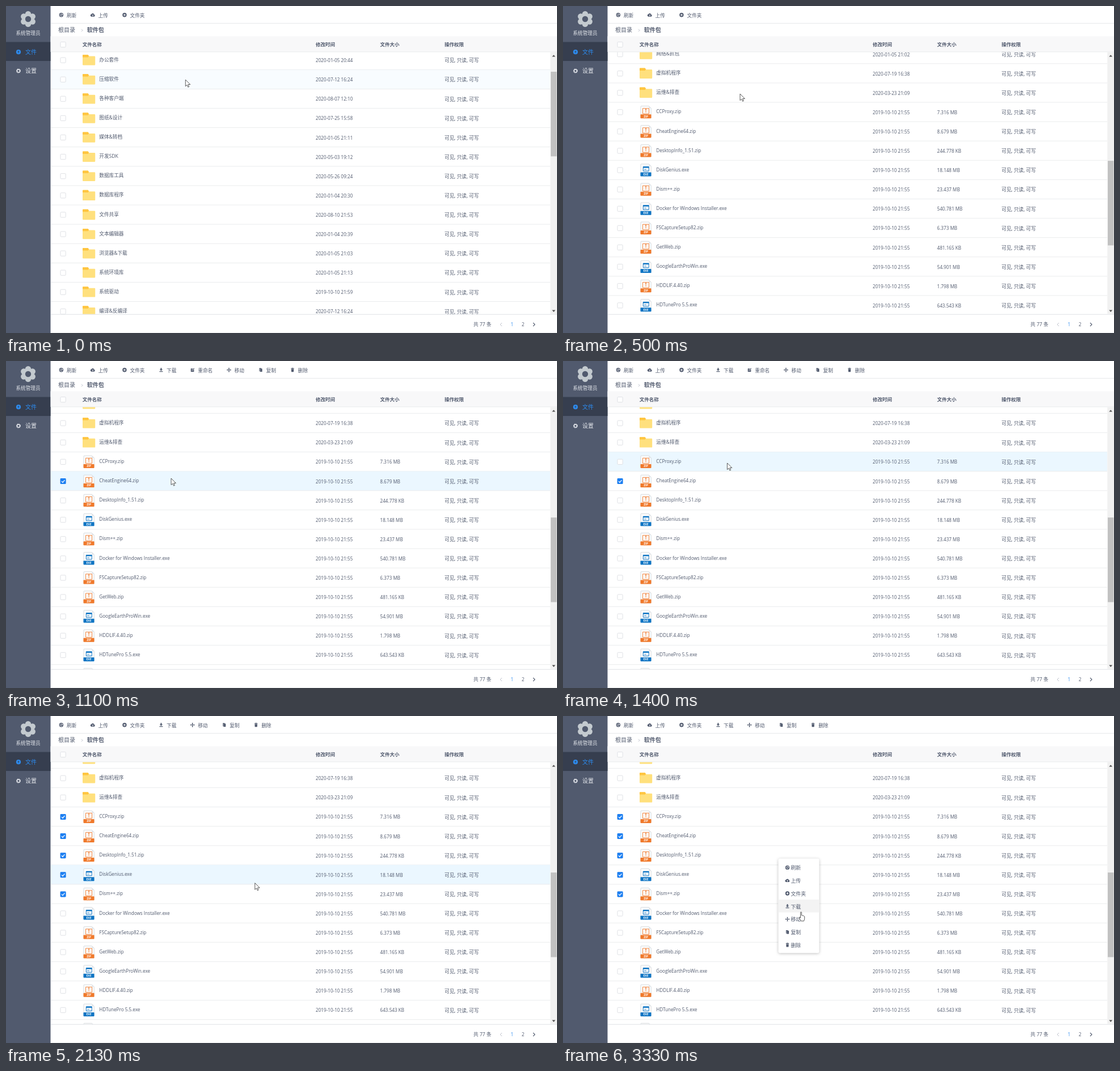
Write an HTML page that moves like this. It is 971 px wide and 577 px high and loops after 4330 ms.

```html
<!DOCTYPE html>
<html>
<head>
<meta charset="utf-8">
<style>
html, body { margin: 0; width: 100%; height: 100%; overflow: hidden; background: #fff; }
svg { display: block; width: 971px; height: 577px; }
text { font-family: "Open Sans", "Noto Sans CJK SC", "Noto Sans CJK", sans-serif; font-size: 8.65px; fill: #515a6e; white-space: pre; }
.latin { font-size: 8.15px; }
.big { font-size: 10px; }
.bold { font-weight: 700; }
.tag { font-size: 5px; font-weight: 700; fill: #fff; text-anchor: middle; }
</style>
</head>
<body>
<svg id="stage" viewBox="0 0 971 577" xmlns="http://www.w3.org/2000/svg"></svg>
<script>
const LOOP = 4330, PITCH = 34.1, FIRST = 95.2;
const INK = '#515a6e', BLUE = '#2d8cf0', LINE = '#e8eaec';
const stage = document.getElementById('stage');
const $ = id => document.getElementById(id);

const rect = (x, y, w, h, fill, more = '') =>
  `<rect x="${x}" y="${y}" width="${w}" height="${h}" fill="${fill}" ${more}/>`;
const dot = (x, y, r, fill, more = '') =>
  `<circle cx="${x}" cy="${y}" r="${r}" fill="${fill}" ${more}/>`;
const path = (d, fill, more = '') => `<path d="${d}" fill="${fill}" ${more}/>`;
const stroke = (d, color, w = 1, more = '') =>
  path(d, 'none', `stroke="${color}" stroke-width="${w}" ${more}`);
const text = (x, y, s, cls = '', more = '') =>
  `<text x="${x}" y="${y}" class="${cls}" ${more}>${s.replace(/&/g, '&amp;')}</text>`;
const group = (id, body, more = '') => `<g id="${id}" ${more}>${body}</g>`;
const at = (x, y, body) => `<g transform="translate(${x} ${y})">${body}</g>`;

// Small icons, centred on 0,0
const icons = {
  refresh: dot(0, 0, 3.7, INK) + stroke('M1.7-.8A1.9 1.9 0 1 0 1.6 1.1M2.2-2V-.4H.6', '#fff', .8),
  upload: path('M-2.4 2.9A2.1 2.1 0 0 1-2.6-1.2A2.8 2.8 0 0 1 2.5-.9A2 2 0 0 1 2.4 2.9Z', INK) +
    stroke('M0 2.4V-.2M-1.2 .8L0-.4L1.2 .8', '#fff', .8),
  folder: dot(0, 0, 3.7, INK) + stroke('M-2 0H2M0-2V2', '#fff', 1),
  download: path('M-1-3.6H1V-1H2.7L0 1.7L-2.7-1H-1Z', INK) + rect(-3, 2.2, 6, 1.2, INK),
  rename: path('M-3-2.6H1L-1.2-.4V1.2H.4L2.6-1V3.2H-3Z', INK) + stroke('M-.5 .5L3-3', INK, 1.2),
  move: stroke('M-3.4 0H3.4M0-3.4V3.4', INK, 1.1) +
    path('M0-4L1.5-2.4H-1.5ZM0 4L1.5 2.4H-1.5ZM-4 0L-2.4-1.5V1.5ZM4 0L2.4-1.5V1.5Z', INK),
  copy: path('M-2.6-3.3H1V-2.2H2.6V3.3H-1.4V2.2H-2.6Z', INK) + stroke('M-1.4-2V2.2', '#fff', .5),
  trash: rect(-2.7, -3.2, 5.4, 1.1, INK) + path('M-2.3-1.6H2.3L2 3.4H-2Z', INK) + rect(-1, -3.8, 2, 1, INK)
};
const tools = [
  ['refresh', '刷新', 107], ['upload', '上传', 162.5], ['folder', '文件夹', 218.5],
  ['download', '下载', 283], ['rename', '重命名', 338.3], ['move', '移动', 402.5],
  ['copy', '复制', 458.5], ['trash', '删除', 514.5]
];

const folders = `办公套件|2020-01-05 20:44
压缩软件|2020-07-12 16:24
各种客户端|2020-08-07 12:10
图纸&设计|2020-07-25 15:58
媒体&转档|2020-01-05 21:11
开发SDK|2020-05-03 19:12
数据库工具|2020-05-26 09:24
数据库程序|2020-01-04 20:30
文件共享|2020-08-10 21:53
文本编辑器|2020-01-04 20:39
浏览器&下载|2020-01-05 21:03
系统环境库|2020-01-05 21:13
系统驱动|2019-10-10 21:59
编译&反编译|2020-07-12 16:24
网络&抓包|2020-01-05 21:02
虚拟机程序|2020-07-19 16:38
运维&排查|2020-03-23 21:09`;
const files = `CCProxy.zip|7.316 MB
CheatEngine64.zip|8.679 MB
DesktopInfo_1.51.zip|244.778 KB
DiskGenius.exe|18.148 MB
Dism++.zip|23.437 MB
Docker for Windows Installer.exe|540.781 MB
FSCaptureSetup82.zip|6.373 MB
GetWeb.zip|481.165 KB
GoogleEarthProWin.exe|54.901 MB
HDDLIF.4.40.zip|1.798 MB
HDTunePro 5.5.exe|643.543 KB
Setup.zip|1.024 MB`;
const rows = [
  ...folders.split('\n').map(s => s.split('|')),
  ...files.split('\n').map(s => { const [n, size] = s.split('|'); return [n, '2019-10-10 21:55', size]; })
];

const box = y => rect(96, y - 4.7, 9.2, 9.2, '#fff', 'rx="1.3" stroke="#dcdee2" stroke-width=".9"');
const folderIcon = path('M135-8.2Q135-9.2 136-9.2H144.5L146.3-6.6H156Q157.2-6.6 157.2-5.4V8Q157.2 9.2 156 9.2H136.2Q135 9.2 135 8Z', '#ffe07d') +
  path('M135-8.2Q135-9.2 136-9.2H144.5L146-7L144.6-4.8H135Z', '#ffc540');
function fileIcon(kind) {
  const zip = kind === 'zip', c = zip ? '#f0792b' : '#0f75c4';
  const mark = zip
    ? stroke('M140.5-6.2H151.5V3.2H140.5Z', c, .9) + stroke('M146-6V-1.5M144.7-4.3H147.3M146-1.5V1', c, .9)
    : stroke('M141.3-5.6H151.2V2H141.3Z', c, 1) + rect(141, -5.8, 10.4, 2.2, c) + stroke('M143-.8H147', c, .8);
  return path('M138-10.4H151.4L155.2-6.6V10.6H137V-9.4Q137-10.4 138-10.4Z', '#fcfcfc', 'stroke="#cfd3d8" stroke-width=".8"') +
    path('M151.4-10.4V-6.6H155.2Z', '#dfe3e7') + mark +
    rect(136.5, 4.4, 19, 7, c, 'rx=".8"') + text(146, 9.8, kind.toUpperCase(), 'tag');
}
function row([name, date, size], i) {
  const latin = /^\w/.test(name);
  return at(0, FIRST + i * PITCH,
    rect(79, -17, 880, 34.1, '#ebf7ff', `id="hover${i}" opacity="0"`) +
    rect(79, 16.7, 880, .9, LINE) + box(.5) +
    group('check' + i, rect(95.6, -4.5, 10, 10, '#1c7ff2', 'rx="1.4"') + stroke('M98 .6L100 2.7L103.4-1.5', '#fff', 1.3)) +
    (size ? fileIcon(name.slice(-3)) : folderIcon) +
    text(164.3, 2.5, name, latin ? 'latin' : '') +
    text(545.8, 3.9, date, 'latin') + text(659.3, 3.9, size || '', 'latin') +
    text(772.8, 4.1, '可见, 只读, 可写'));
}

const lobes = (r, d) => Array.from({ length: 6 }, (_, i) => {
  const a = (i * 60 - 90) * Math.PI / 180;
  return dot((d * Math.cos(a)).toFixed(2), (d * Math.sin(a)).toFixed(2), r, '#c3cacf');
}).join('');

const sidebar = rect(0, 0, 78.5, 577, INK) + rect(0, 63.5, 78.5, 33.5, '#363e4f') +
  at(39, 23, lobes(5.2, 8.9) + dot(0, 0, 9.6, '#c3cacf') + dot(0, 0, 5.2, INK)) +
  text(39, 51, '系统管理员', '', 'text-anchor="middle" style="fill:#e4e7ec"') +
  at(22, 81.2, dot(0, 0, 4.1, BLUE) + stroke('M0 2V-1.6M-1.5 0L0-1.7L1.5 0', '#363e4f', .9)) +
  text(34, 84.5, '文件', 'big', `style="fill:${BLUE}"`) +
  at(22, 114.5, dot(0, 0, 2.5, 'none', 'stroke="#e4e7ec" stroke-width="1.4"') +
    dot(0, 0, 3.5, 'none', 'stroke="#e4e7ec" stroke-width="1.1" stroke-dasharray="1.4 1.35"')) +
  text(34, 117.7, '设置', 'big', 'style="fill:#e4e7ec"');

const toolbar = tools.map(([icon, label, x], i) =>
  group('tool' + i, at(x - 9.6, 15.8, icons[icon]) + text(x, 19.6, label))).join('');

const header = rect(79, 30.2, 892, .9, '#e3e5e8') +
  text(92, 46.4, '根目录', 'big') + stroke('M132.5 41L135.5 43L132.5 45', '#b9bec8', .7) +
  text(142.8, 46.4, '软件包', 'big bold') +
  rect(78.5, 53.3, 892.5, 27.7, '#f8f8f9') + rect(79, 80.5, 892, .9, LINE) + box(68.2) +
  [['文件名称', 134.8], ['修改时间', 545.8], ['文件大小', 659.3], ['操作权限', 772.8]]
    .map(([s, x]) => text(x, 71.4, s, 'bold', 'style="font-size:8.5px"')).join('');

const footer = rect(79, 543.7, 892, 1, '#dfe1e5') + rect(79, 575.8, 892, .9, LINE) +
  text(823.8, 564.8, '共 77 条') + stroke('M874 559L871 562L874 565', '#c0c4cc', 1) +
  text(889.6, 565, '1', 'latin', `style="fill:${BLUE}"`) + text(908.8, 565, '2', 'latin') +
  stroke('M929 559L932 562L929 565', INK, 1.1);

const scrollbar = rect(959.3, 81.5, 11.7, 462, '#f1f1f1') +
  path('M962.3 89.5L965.2 86.2L968.1 89.5Z', '#505050') + path('M962.3 536.6L965.2 539.9L968.1 536.6Z', '#505050') +
  rect(960, 116, 10.4, 149.3, '#c1c1c1', 'id="thumb"');

const menu = group('menu',
  rect(379.5, 251.5, 72, 166.8, '#fff', 'rx="3" style="filter:drop-shadow(0 1px 2.5px rgba(0,0,0,.25))"') +
  rect(379.5, 324, 72, 22.6, '#f3f3f3', 'id="pick"') +
  tools.filter(t => t[0] !== 'rename').map(([icon, label], i) =>
    at(395.5, 267.4 + i * 22.77, icons[icon] + text(6, 3.9, label, '', 'style="font-size:8.9px"'))).join(''));

const pointer = group('pointer',
  dot(.2, -.2, 1.9, '#f5c6bd', 'id="press" stroke="#d0452f" stroke-width="1"') +
  path('M0 0V11.6L2.7 9.2L4.5 13.2L6.3 12.4L4.6 8.5H8.4Z', '#fff', 'id="arrow" stroke="#333" stroke-width=".8"') +
  path('M2 1.2Q2 0 3 0T4 1.2V6L6 6.3L8 7L9.2 8V12L8 16H3.2L.2 11.5Q-1 9.6 .6 9.3L2 10.6Z', '#fff', 'id="hand" stroke="#333" stroke-width=".8"'));

stage.innerHTML = `<clipPath id="view">${rect(79, 81.3, 892, 462.4, '#000')}</clipPath>` +
  rect(0, 0, 971, 577, '#fff') +
  `<g clip-path="url(#view)">${group('list', rows.map(row).join(''))}</g>` +
  sidebar + toolbar + header + footer + scrollbar +
  rect(278.5, 173.3, 0, 0, 'rgba(45,140,240,.08)', 'id="lasso" stroke="#333" stroke-width=".9" stroke-dasharray="2.4 1.5"') +
  menu + pointer;

// Timed values: [time, ...values]
const scrollKeys = [[0, 0], [100, 112], [200, 236], [300, 352.8], [400, 440], [500, 488], [600, 497.4]];
const pointerKeys = [
  [0, 316.3, 130], [300, 322.7, 137.2], [500, 312, 155], [700, 283, 173.5], [1000, 291, 208], [1200, 291, 206],
  [1400, 289.4, 180], [1500, 278.5, 173.3], [1600, 314, 198], [1700, 380, 246], [1730, 418, 274], [1830, 454.3, 303.8],
  [1930, 466, 315], [2030, 466, 316], [2330, 384, 252], [2430, 380.5, 248], [2730, 410, 333],
  [2930, 402, 268], [3030, 402, 268], [3330, 416.5, 345.8]
];
const lassoKeys = [[1500, 278.5, 173.3], [1600, 302, 190], [1700, 360, 233], [1730, 392, 258], [1830, 435, 290], [1930, 459, 308]];
const checkKeys = [[0, 0, -1], [1000, 18, 18], [1500, 17, 17], [1700, 17, 18], [1730, 17, 19], [1830, 17, 20], [1930, 17, 21]];
const hoverKeys = [
  [0, 1, .35], [100, -1, 0], [600, 17, .5], [700, 17, 1], [1000, 18, 1], [1300, 17, 1], [1700, 18, 1],
  [1730, 19, 1], [1830, 20, 1], [1930, 21, 1], [2130, 20, 1], [2330, 19, 1], [2530, 19, .4], [2630, -1, 0]
];

const hold = (keys, t) => keys.filter(k => k[0] <= t).pop() || keys[0];
function tween(keys, t) {
  const a = hold(keys, t), b = keys[keys.indexOf(a) + 1];
  if (!b || t <= a[0]) return a.slice(1);
  const p = (t - a[0]) / (b[0] - a[0]);
  return a.slice(1).map((v, i) => v + (b[i + 1] - v) * p);
}
const show = (id, on) => $(id).setAttribute('display', on ? 'inline' : 'none');
const set = (id, name, value) => $(id).setAttribute(name, value);

function draw(time) {
  const base = time < 1730 ? 0 : 1730;
  const t = Math.min(3330, base + Math.floor((time - base) / 100) * 100);

  const [y] = tween(scrollKeys, t);
  set('list', 'transform', `translate(0 ${-y})`);
  set('thumb', 'y', 116 + y * .322);

  const [, from, to] = hold(checkKeys, t), [, over, alpha] = hold(hoverKeys, t);
  rows.forEach((_, i) => {
    show('check' + i, i >= from && i <= to);
    set('hover' + i, 'opacity', i === over ? alpha : 0);
  });

  const count = to - from + 1;
  tools.forEach((_, i) => {
    show('tool' + i, i < 3 || count === 1 || (count > 1 && i !== 4));
    set('tool' + i, 'transform', `translate(${count > 1 && i > 4 ? -64.3 : 0} 0)`);
  });

  const drag = t >= 1600 && t < 2030, [lx, ly] = tween(lassoKeys, t);
  show('lasso', drag);
  set('lasso', 'width', lx - 278.5);
  set('lasso', 'height', ly - 173.3);

  show('menu', t >= 2430);
  show('pick', t >= 2730);
  const [px, py] = tween(pointerKeys, t), hand = t >= 2630;
  set('pointer', 'transform', `translate(${px} ${py})`);
  show('press', drag);
  show('arrow', !hand);
  show('hand', hand);
}

const start = performance.now();
function tick() {
  draw((performance.now() - start) % LOOP);
  requestAnimationFrame(tick);
}
tick();
</script>
</body>
</html>
```
